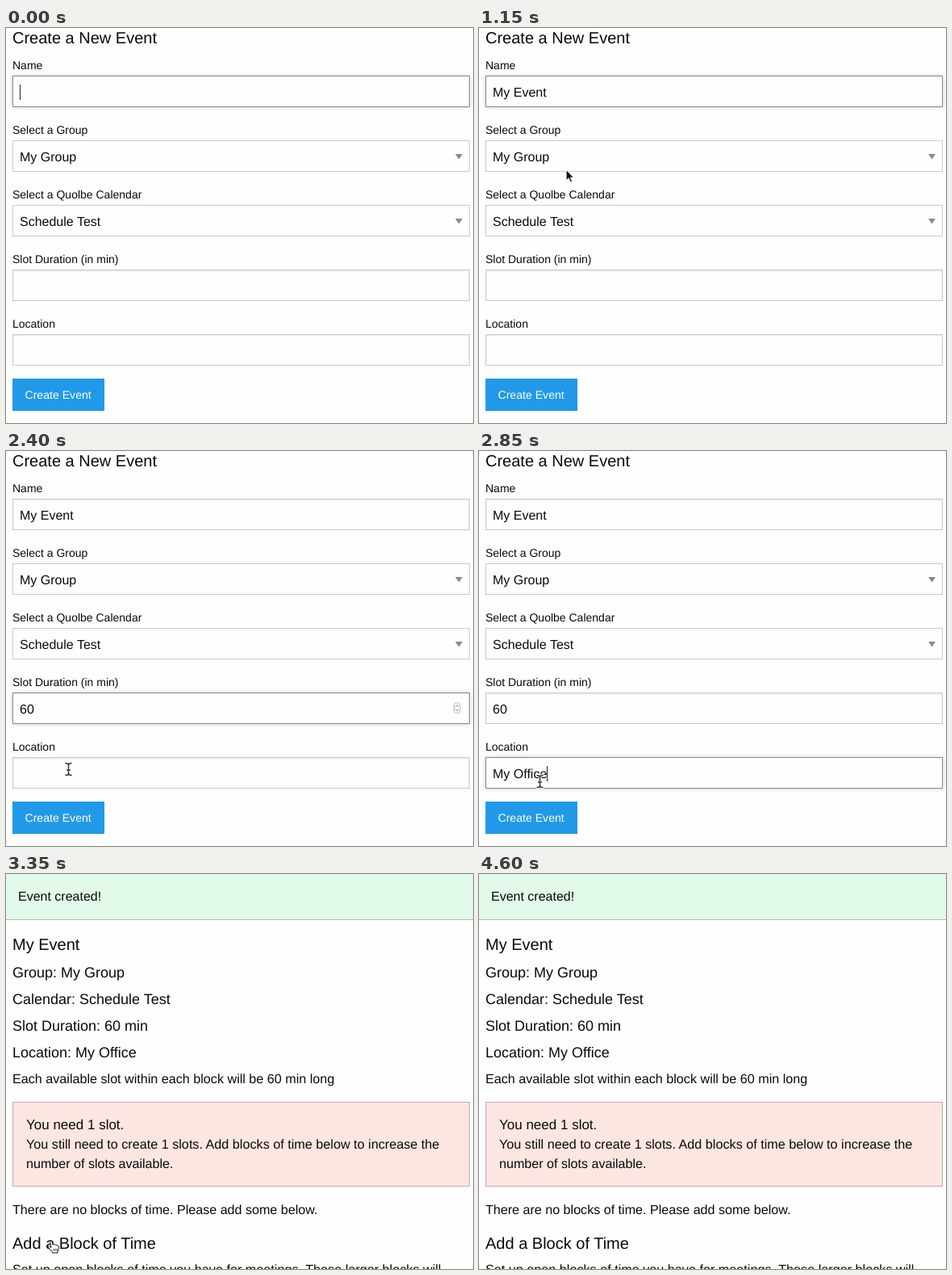
An HTML page that plays this animation: 579 by 489 pixels, repeating every 4.7 s.

```html
<!DOCTYPE html>
<html lang="en">
<head>
<meta charset="utf-8">
<title>Create a New Event</title>
<style>
  html, body { margin: 0; width: 100%; height: 100%; overflow: hidden; background: #fefefe; }
  .page, svg { position: absolute; left: 0; top: 0; width: 579px; height: 489px; overflow: hidden; }
  .page div { position: absolute; box-sizing: border-box; }
  .field { left: 8px; width: 567px; height: 39px; border: 1px solid #cacaca; background: #fefefe; }
  .pick { border-color: #cacad2; }
  #button { left: 8px; top: 434px; width: 114px; height: 40px; }
  #done { left: 0; top: 0; width: 579px; height: 57px; background: #e1faea; border-bottom: 1px solid #a9bbb0; }
  #alert { left: 8px; top: 282px; width: 567px; height: 105px; background: #fce6e2; border: 1px solid #c6aba8; }
  text { font-family: "Liberation Sans", Arial, Helvetica, sans-serif; fill: #0a0a0a; text-rendering: geometricPrecision; }
</style>
</head>
<body>
<div class="page" id="formBoxes"><div id="button"></div></div>
<div class="page" id="eventBoxes"><div id="done"></div><div id="alert"></div></div>
<svg viewBox="0 0 579 489">
  <g id="form">
    <g id="spinner" fill="none" stroke="#777">
      <rect x="555.5" y="311.5" width="7.5" height="13" rx="3.5" fill="#fff" stroke="#b8b8b8"/>
      <path d="M557.4 316.6l1.8-2.2 1.8 2.2M557.4 319.6l1.8 2.2 1.8-2.2"/>
    </g>
    <rect id="caret" width="1" height="19" fill="#222"/>
  </g>
  <g id="event"></g>
  <g id="arrow">
    <path d="M0 0V14.3L3.2 11.3 5.5 16.3 7.9 15.3 5.7 10.4H10Z" fill="#111" stroke="#fff" stroke-width="1.2"/>
  </g>
  <g id="beam" fill="none" stroke-linecap="round">
    <path id="beamLine" d="M-3.5-7.5Q0-7.5 0-5V5Q0 7.5-3.5 7.5M3.5-7.5Q0-7.5 0-5M0 5Q0 7.5 3.5 7.5M-2 1H2" stroke="#fff" stroke-width="3"/>
    <use href="#beamLine"/>
    <path d="M-3.5-7.5Q0-7.5 0-5V5Q0 7.5-3.5 7.5M3.5-7.5Q0-7.5 0-5M0 5Q0 7.5 3.5 7.5M-2 1H2" stroke="#3a3a3e" stroke-width="1.5"/>
  </g>
  <g id="hand" stroke="#111" stroke-linejoin="round">
    <path transform="translate(-5 -1)" fill="#fff" d="M5 9.5L3.6 3C3.2 1 5.4.4 6 2.2L7.3 6.2C7.8 5 9.4 5 9.8 6.4 10.4 5.6 11.9 5.8 12.2 7 13 6.4 14.3 7 14.4 8.4 14.6 11 13.8 12.5 13 14V16H6.6L6.4 14.6C5 13 3 11 1.6 9.6.6 8.4 2 7.3 3.2 8Z"/>
    <path d="M3.2 9.8v3M5.2 9.8v3M7.2 9.8v3" stroke-width=".8"/>
  </g>
</svg>
<script>
const LOOP = 4700, STEP = 50, SUBMIT = 3350;
const $ = id => document.getElementById(id);

function label(parent, x, y, size, str, fill) {
  const el = document.createElementNS("http://www.w3.org/2000/svg", "text");
  el.setAttribute("x", x);
  el.setAttribute("y", y);
  el.setAttribute("font-size", size);
  if (fill) el.style.fill = fill;
  el.textContent = str;
  $(parent).appendChild(el);
  return el;
}

// Form page
const rows = [
  { name: "Name" },
  { name: "Select a Group", value: "My Group" },
  { name: "Select a Quolbe Calendar", value: "Schedule Test" },
  { name: "Slot Duration (in min)" },
  { name: "Location" }
];
label("form", 8, 19, 20, "Create a New Event");
rows.forEach((row, i) => {
  row.top = 59 + 80 * i;
  row.box = document.createElement("div");
  row.box.className = row.value ? "field pick" : "field";
  row.box.style.top = row.top + "px";
  $("formBoxes").appendChild(row.box);
  label("form", 8, row.top - 8, 14, row.name);
  row.text = label("form", 17, row.top + 26, 16, row.value || "");
  if (row.value) {
    const tri = document.createElementNS("http://www.w3.org/2000/svg", "path");
    tri.setAttribute("d", `M557 ${row.top + 17}h9l-4.5 6.5z`);
    tri.setAttribute("fill", "#8a8a8a");
    $("form").appendChild(tri);
  }
});
label("form", 23.5, 459, 14.1, "Create Event", "#fefefe");

// Event page
[
  [15, 33, 16, "Event created!"],
  [8, 94, 20, "My Event"],
  [8, 128, 18, "Group: My Group"],
  [8, 161, 18, "Calendar: Schedule Test"],
  [8, 194, 18, "Slot Duration: 60 min"],
  [8, 227, 18, "Location: My Office"],
  [8, 259, 16.15, "Each available slot within each block will be 60 min long"],
  [25, 316, 17, "You need 1 slot."],
  [25, 340, 16.2, "You still need to create 1 slots. Add blocks of time below to increase the"],
  [25, 364, 16.1, "number of slots available."],
  [8, 421, 16.1, "There are no blocks of time. Please add some below."],
  [8, 464, 20, "Add a Block of Time"],
  [8, 495, 16.2, "Set up open blocks of time you have for meetings. These larger blocks will"]
].forEach(line => label("event", ...line));

// Pointer path: time, x, y, shape
const path = [
  [0, 126, 74, ""],
  [550, 126, 74, "beam"],
  [750, 117, 106, "arrow"],
  [1000, 108, 162, "arrow"],
  [1100, 108, 162, "arrow"],
  [1150, 108, 175, "arrow"],
  [1300, 97, 262, "arrow"],
  [1350, 95, 254, "arrow"],
  [1600, 95, 254, "arrow"],
  [1700, 84, 302, "beam"],
  [1800, 77.5, 325, "beam"],
  [2150, 77.5, 325, ""],
  [2250, 77.5, 330, "beam"],
  [2350, 77.5, 390, "beam"],
  [2400, 77.5, 394, "beam"],
  [2450, 77.5, 394, ""],
  [2800, 77, 398, "beam"],
  [2900, 74, 420, "arrow"],
  [3000, 68, 442, "hand"],
  [3100, 60, 471, "hand"],
  [3150, 57, 463, "hand"],
  [3250, 56, 454, "hand"],
  [4300, 56, 454, "hand"],
  [4350, 75, 452, "arrow"],
  [4550, 565, 357, "arrow"],
  [4600, 590, 356, ""],
  [LOOP, 590, 356, ""]
];

const ramp = (t, from, len) => Math.min(1, Math.max(0, (t - from) / len));
const mix = (a, b, k) => `rgb(${a.map((v, i) => Math.round(v + (b[i] - v) * k))})`;
const within = (t, from, to) => t >= from && t < to;
const show = (id, on) => { $(id).style.display = on ? "" : "none"; };

function setFocus(row, k) {
  row.box.style.borderColor = mix([202, 202, 202], [138, 138, 142], k);
  row.box.style.boxShadow =
    `inset 0 1px 2px rgba(10,10,10,${0.1 * (1 - k)}), 0 0 5px rgba(202,202,202,${k})`;
}

function drawPointer(t) {
  let i = 0;
  while (i < path.length - 2 && path[i + 1][0] <= t) i++;
  const [t0, x0, y0, shape] = path[i], [t1, x1, y1] = path[i + 1];
  const k = ramp(t, t0, t1 - t0);
  for (const id of ["arrow", "beam", "hand"]) show(id, id === shape);
  if (shape) $(shape).setAttribute("transform", `translate(${x0 + (x1 - x0) * k} ${y0 + (y1 - y0) * k})`);
}

function drawForm(t) {
  const [name, , , slot, place] = rows;
  name.text.textContent = t < 50 ? "" : t < 250 ? "M" : "My Event";
  slot.text.textContent = t < 2150 ? "" : t < 2200 ? "6" : "60";
  place.text.textContent = t < 2500 ? "" : t < 2650 ? "M" : "My Office";

  const swap = ramp(t, 2050, 150);
  setFocus(name, 1 - swap);
  setFocus(slot, t < 2450 ? swap : 0);
  setFocus(place, t < 2450 ? 0 : 1);
  show("spinner", within(t, 1700, 2450));
  $("button").style.background = mix([33, 153, 232], [21, 131, 204], ramp(t, 3050, 500));

  const active = t < 800 || within(t, 1300, 2050) ? name
    : within(t, 2050, 2400) ? slot
    : within(t, 2450, 3150) ? place : null;
  show("caret", active);
  if (active) {
    const len = active.text.textContent ? active.text.getComputedTextLength() : 0;
    $("caret").setAttribute("x", Math.round(17 + len));
    $("caret").setAttribute("y", active.top + 11);
  }
}

function frame(now) {
  const t = Math.floor(now % LOOP / STEP) * STEP;
  const onForm = t < SUBMIT;
  show("form", onForm);
  show("formBoxes", onForm);
  show("event", !onForm);
  show("eventBoxes", !onForm);
  if (onForm) drawForm(t);
  drawPointer(t);
}

let start;
function tick(now) {
  if (start === undefined) start = now;
  frame(now - start);
  requestAnimationFrame(tick);
}
frame(0);
requestAnimationFrame(tick);
</script>
</body>
</html>
```
